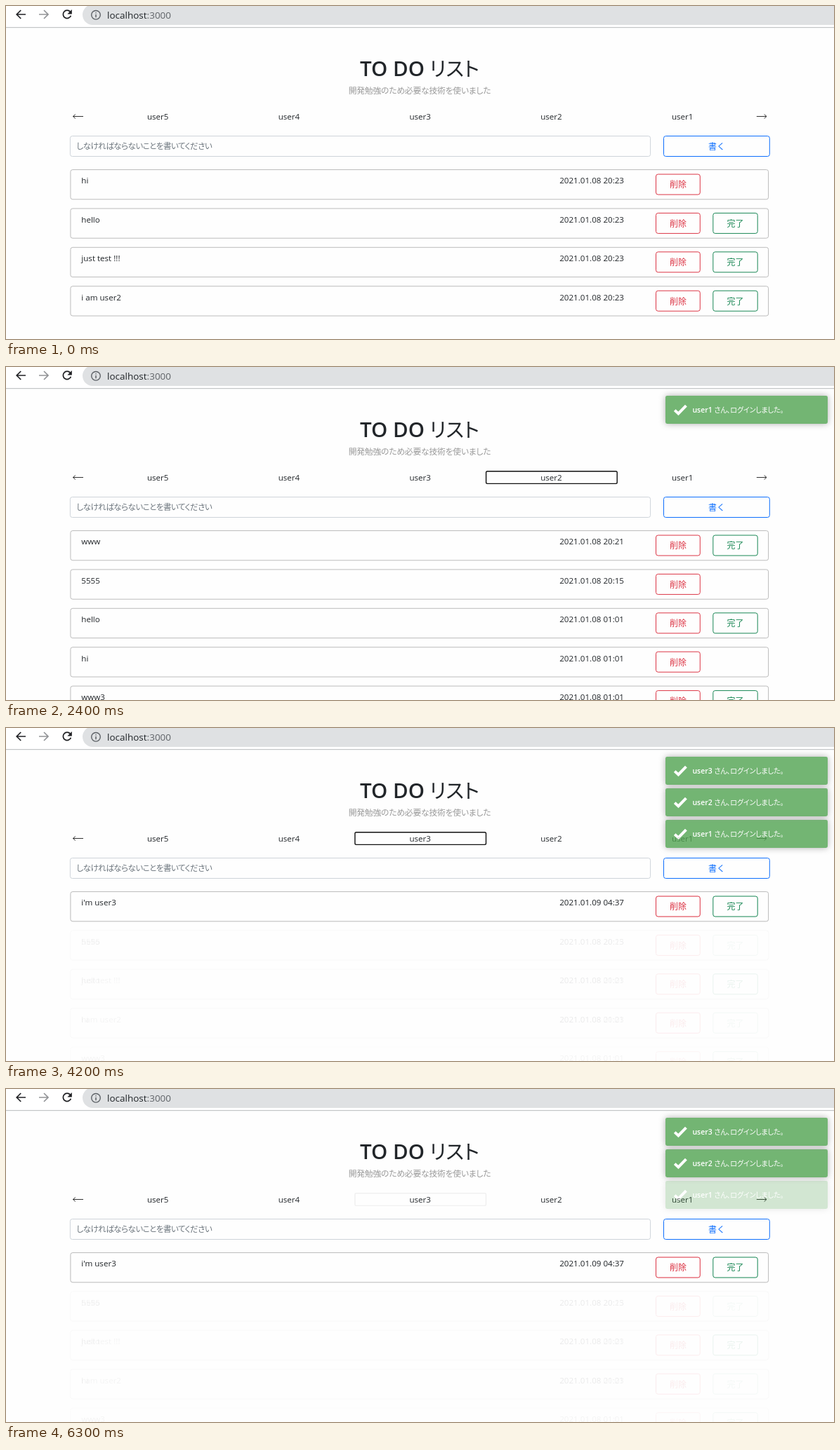
Animation, 1179 px wide and 475 px high, one loop 6.4 s. Source, as an HTML page:

```html
<!DOCTYPE html>
<html lang="ja">
<head>
<meta charset="utf-8">
<title>TO DO リスト</title>
<style>
html, body { margin: 0; width: 100%; height: 100%; overflow: hidden; background: #fefefe; }
body, text { font-family: "Open Sans", "Noto Sans CJK JP", "Noto Sans CJK", sans-serif; }
#stage { position: absolute; left: 0; top: 0; width: 1179px; height: 475px; overflow: hidden; }
#stage > svg { position: absolute; left: 0; top: 0; }
text { font-size: 11.6px; fill: #212529; font-feature-settings: "palt"; white-space: pre; }
.mid { text-anchor: middle; }
.kanji { font-size: 12px; font-weight: 350; font-feature-settings: normal; }
.toast {
  position: absolute; left: 939.4px; width: 230.4px; height: 39.6px;
  border-radius: 2.4px; background: #51a351; box-shadow: 0 0 9.6px #999; opacity: 0;
}
.toast.hover { box-shadow: 0 0 9.6px #000; }
.toast svg { display: block; }
.toast text { font-size: 10.5px; font-weight: 600; fill: #fff; }
.toast .kana { font-size: 10.2px; font-weight: 500; letter-spacing: -.3px; }
</style>
</head>
<body>
<div id="stage"></div>
<script>
const LOOP = 6400, STEP = 100;
const RED = '#dc3545', GREEN = '#198754', BLUE = '#0d6efd';

// each item: text, date, has a "done" button
const LISTS = {
  user1: [
    ['www', '2021.01.08 20:21', 1],
    ['5555', '2021.01.08 20:15', 0],
    ['hello', '2021.01.08 01:01', 1],
    ['hi', '2021.01.08 01:01', 0],
    ['www3', '2021.01.08 01:01', 1]
  ],
  user2: [
    ['hi', '2021.01.08 20:23', 0],
    ['hello', '2021.01.08 20:23', 1],
    ['just test !!!', '2021.01.08 20:23', 1],
    ['i am user2', '2021.01.08 20:23', 1]
  ],
  user3: [["i'm user3", '2021.01.09 04:37', 1]]
};

// visible list and the faint remains of earlier ones
const VIEWS = [
  { at: 0, list: 'user2', faint: [] },
  { at: 1400, list: 'user1', faint: [] },
  { at: 2600, list: 'user2', faint: ['user1'] },
  { at: 3900, list: 'user3', faint: ['user1', 'user2'] }
];

const FOCUS = [
  { at: 0, user: '' },
  { at: 1100, user: 'user1' },
  { at: 2400, user: 'user2' },
  { at: 3700, user: 'user3' }
];

const TOASTS = [
  { user: 'user1', at: 1400, fade: 1410 },
  { user: 'user2', at: 2600, fade: 2594 },
  { user: 'user3', at: 3900, fade: 3894 }
];
const HOVER = [4700, 4800], BLUR = 5700, HIDE = 5680, HIDE_MS = 1000;

const stage = document.getElementById('stage');
const text = (x, y, s, attrs = '') => `<text x="${x}" y="${y}" ${attrs}>${s}</text>`;
const box = (x, y, w, h, stroke, attrs = '') =>
  `<rect x="${x}" y="${y}" width="${w}" height="${h}" rx="3" fill="#fff" fill-opacity="0" stroke="${stroke}" ${attrs}/>`;
const line = (d, stroke, width = 1, attrs = '') =>
  `<path d="${d}" fill="none" stroke="${stroke}" stroke-width="${width}" ${attrs}/>`;

function button(x, y, w, label, color) {
  return box(x, y, w, 29, color) +
    text(x + w / 2, y + 19.3, label, `class="mid kanji" style="fill:${color}"`);
}

function row([label, date, open], i) {
  const y = 233.5 + i * 55.4;
  return box(91.9, y, 993.7, 42.3, '#bcbcbc') +
    text(107.3, y + 19.9, label) +
    text(788.2, y + 19.9, date) +
    button(925.5, y + 6.5, 62.8, '削除', RED) +
    (open ? button(1006.8, y + 6.5, 63.4, '完了', GREEN) : '');
}

function chrome() {
  const dark = '#202124';
  return '<rect width="1179" height="30" fill="#fff"/>' +
    '<rect x="109" y="-2" width="1200" height="29" rx="14.5" fill="#dfe1e3"/>' +
    '<rect y="30" width="1179" height="1.2" fill="#c3c5c7"/>' +
    line('M28 12H15.5M21.2 6L15.2 12L21.2 18', dark, 1.7) +
    line('M47 12H59.7M54 6L60 12L54 18', '#929497', 1.7) +
    line('M91.4 8.2A5.7 5.7 0 1 0 92.4 13.8', dark, 1.8) +
    `<path d="M93.8 5V11.4H87.4Z" fill="${dark}"/>` +
    '<circle cx="128" cy="12.8" r="6.3" fill="none" stroke="#5f6368" stroke-width="1.4"/>' +
    line('M128 12V16.3M128 9.2V10.6', '#5f6368', 1.5) +
    text(144, 17.6, '<tspan>localhost</tspan><tspan fill="#5f6368">:3000</tspan>', 'style="font-size:13.5px"');
}

function header() {
  const users = [5, 4, 3, 2, 1].map((n, i) =>
    text(216.2 + i * 186.75, 161.8, 'user' + n, 'class="mid"')).join('');
  return text(504, 100, 'TO DO', 'style="font-size:29.5px;font-weight:600"') +
    text(674, 100, 'リスト', 'text-anchor="end" style="font-size:28.5px;font-weight:500"') +
    text(589, 124.6, '開発勉強のため必要な技術を使いました',
      'class="mid" style="font-size:11.8px;font-weight:350;letter-spacing:-.2px;fill:#999"') +
    users +
    line('M95.5 157.5H110M98.8 154.5L95.5 157.5L98.8 160.5', '#333') +
    line('M1068.8 157.5H1083M1079.7 154.5L1083 157.5L1079.7 160.5', '#333') +
    box(91.4, 185.5, 826.2, 29, '#ced4da') +
    text(100.5, 204, 'しなければならないことを書いてください',
      'style="font-size:11.5px;font-weight:350;letter-spacing:-.5px;fill:#6c757d"') +
    button(936.5, 185.5, 150.8, '書く', BLUE);
}

const outline = x =>
  `<rect x="${x}" y="148.8" width="186.6" height="17.6" rx="1.8" fill="none" stroke="#101010" stroke-width="1.4"/>`;
// the last tab is cut off at its right edge
const OUTLINES = {
  user1: line('M1055 148.6H871.6Q870.2 148.6 870.2 150V165Q870.2 166.4 871.6 166.4H1055', '#101010', 1.2) +
    line('M870.3 149.5V165.5', '#101010', 1.7),
  user2: outline(683.6),
  user3: outline(496.9)
};

const groups = (prefix, map, draw) => Object.keys(map)
  .map(k => `<g id="${prefix}-${k}">${draw(map[k])}</g>`).join('');

stage.innerHTML = '<svg width="1179" height="475" viewBox="0 0 1179 475">' +
  chrome() + header() +
  groups('focus', OUTLINES, s => s) +
  groups('list', LISTS, rows => rows.map(row).join('')) + '</svg>' +
  TOASTS.map(({ user }) => `<div class="toast" id="toast-${user}"><svg width="230" height="40">` +
    line('M13.2 20.6L18.4 25.4L29.4 14.2', '#fff', 4) +
    text(38.4, 24.2, `${user} <tspan class="kana">さん、ログインしました。</tspan>`) +
    '</svg></div>').join('');

const get = id => document.getElementById(id);
const clamp = v => Math.max(0, Math.min(1, v));
const swing = p => 0.5 - Math.cos(clamp(p) * Math.PI) / 2;
const current = (steps, t) => steps.filter(s => s.at <= t).pop();

function render(t) {
  const view = current(VIEWS, t), focus = current(FOCUS, t).user;
  for (const user in LISTS) {
    get('list-' + user).style.opacity =
      user === view.list ? 1 : view.faint.includes(user) ? 0.045 : 0;
    get('focus-' + user).style.opacity = user !== focus ? 0 : t >= BLUR ? 0.06 : 1;
  }
  const shown = TOASTS.filter(n => n.at <= t).length;
  TOASTS.forEach((n, i) => {
    const el = get('toast-' + n.user);
    const hover = i === 0 && t >= HOVER[0] && t < HOVER[1];
    let alpha = i < shown ? 0.8 * swing((t - n.fade) / 300) : 0;
    if (i === 0) alpha *= 1 - swing((t - HIDE) / HIDE_MS);
    el.style.opacity = hover ? 1 : alpha;
    el.style.top = 41.3 + 44.9 * Math.max(0, shown - 1 - i) + 'px';
    el.classList.toggle('hover', hover);
  });
}

const start = performance.now();
function tick() {
  const t = (performance.now() - start) % LOOP;
  render(Math.floor(t / STEP) * STEP);
  requestAnimationFrame(tick);
}
tick();
</script>
</body>
</html>
```
